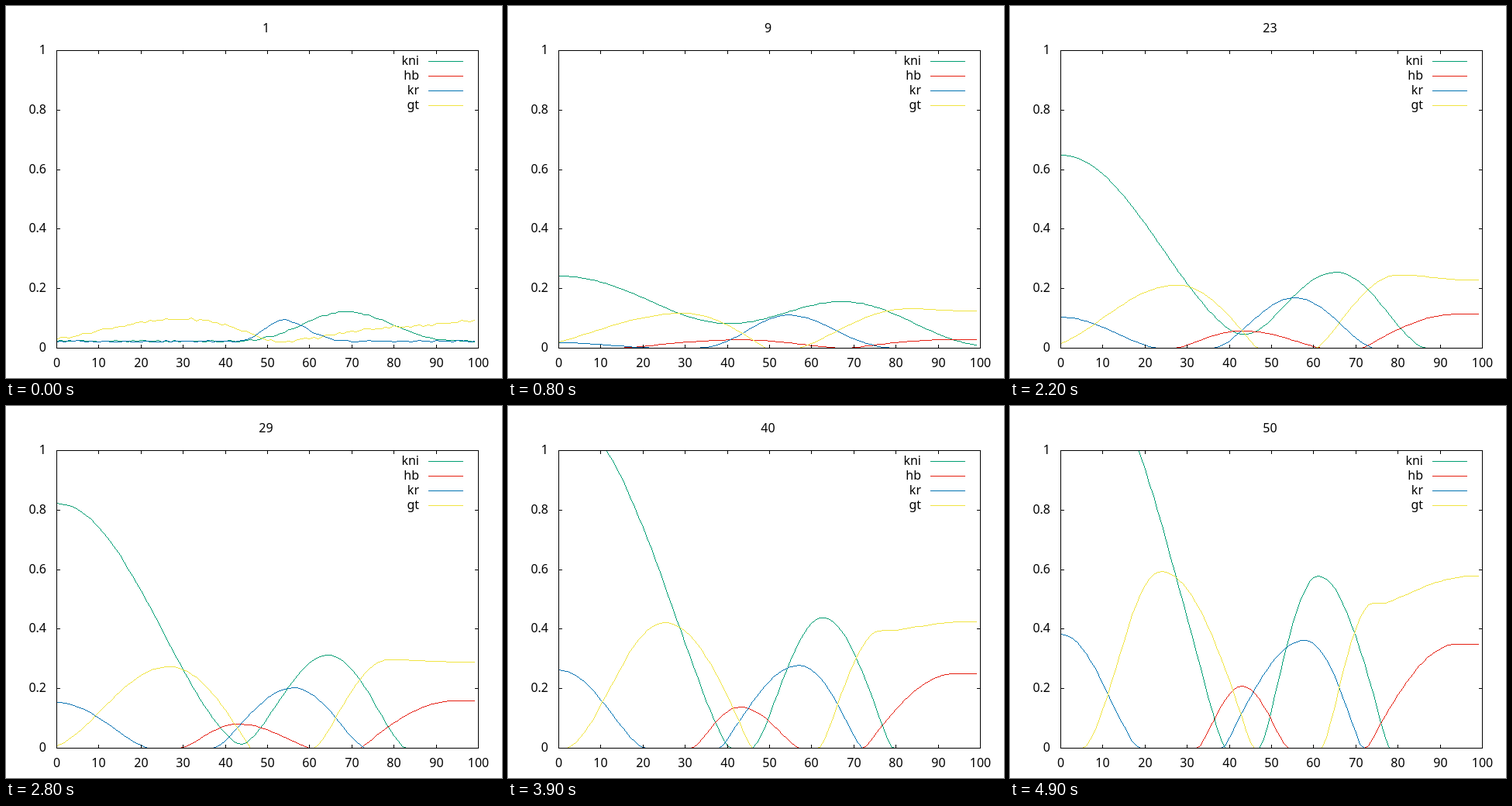
Animation, 640 px wide and 480 px high, one loop 5 s. Source, as an HTML page with a canvas:

```html
<!DOCTYPE html>
<html lang="en">
<head>
<meta charset="utf-8">
<title>Gene expression</title>
<style>
  html, body { margin: 0; width: 100%; height: 100%; overflow: hidden; background: #fff; }
  canvas { display: block; }
</style>
</head>
<body>
<canvas id="stage" width="640" height="480"></canvas>
<script>
const ctx = document.getElementById('stage').getContext('2d');
const STEP = 100, STEPS = 50;
const LEFT = 65, RIGHT = 609, TOP = 57, BOTTOM = 441;
const FLOOR = 0.023;

// Rules for how a parameter changes with the step.
function clock(step) {
  const t = step - 9;
  const decay = Math.pow(2, -t / 8);
  const sharp = Math.max(decay, decay ** 3);
  const early = Math.max(0, 1 - (step - 1) / 8);
  return {
    early,
    // Parabola through the levels at steps 9, 29 and 50.
    grow(a, b, c) {
      const s = (b - a) / 20, r = (c - b) / 21;
      return Math.max(0, a + s * t + (r - s) / 41 * t * (t - 20));
    },
    drift: (a, b) => a + (b - a) * t / 41,
    settle: (a, b) => b + (a - b) * decay,
    power: (last, extra) => last + extra * sharp
  };
}

// Climbs from 0 at the foot to 1 at the peak, from either side.
function limb(x, foot, peak, power) {
  const u = Math.min(1, Math.max(0, (x - foot) / (peak - foot)));
  return Math.pow(Math.sin(u * Math.PI / 2), power);
}

function kni({ grow, drift, settle, power }) {
  const edge = grow(0.242, 0.822, 1.42), edgeFoot = settle(84, 37.4);
  const hump = grow(0.156, 0.312, 0.578), peak = drift(67.5, 61);
  const left = settle(15, 48.2), right = settle(110, 76.8);
  return x => edge * limb(x, edgeFoot, 0, power(1, 4))
    + hump * limb(x, left, peak, power(1.2, 3)) * limb(x, right, peak, power(1, 2));
}

function hb({ grow, drift, settle, early }) {
  const hump = grow(0.028, 0.081, 0.208) * (1 - early);
  const ramp = grow(0.029, 0.158, 0.349) * (1 - early);
  const left = settle(14, 33), right = drift(66.5, 54), foot = settle(69, 72.8);
  return x => hump * limb(x, left, 43, 1.3) * limb(x, right, 43, 1.3)
    + ramp * limb(x, foot, 94, 1);
}

function kr({ grow, drift, settle, power }) {
  const edge = grow(0.018, 0.153, 0.383), edgeFoot = drift(25.5, 18.7);
  const hump = grow(0.111, 0.203, 0.362), peak = drift(54.5, 57.9);
  const left = settle(30, 38.9), right = settle(83, 71), p = power(1, 2);
  return x => edge * limb(x, edgeFoot, 0, power(1.4, 0.5))
    + hump * limb(x, left, peak, p) * limb(x, right, peak, p);
}

function gt({ grow, drift, settle }) {
  const hump = grow(0.117, 0.274, 0.594), peak = drift(29.5, 23.7);
  const left = drift(-9, 5), right = settle(49, 45.3);
  const shelf = grow(0.132, 0.297, 0.488), tail = grow(0.125, 0.289, 0.578);
  const foot = settle(57, 62.2), shoulder = drift(83, 74.2);
  return x => hump * limb(x, left, peak, 1.7) * limb(x, right, peak, 1)
    + shelf * limb(x, foot, shoulder, 1.25)
    + (tail - shelf) * limb(x, shoulder + 3, 98, 1.1);
}

const genes = [
  { name: 'kni', color: '#009e73', shape: kni, floor: FLOOR, noise: 0.0025 },
  { name: 'hb', color: '#e51e10', shape: hb, floor: 0, noise: 0 },
  { name: 'kr', color: '#0072b2', shape: kr, floor: FLOOR, noise: 0.0025 },
  { name: 'gt', color: '#f0e442', shape: gt, floor: FLOOR, noise: 0.004 }
];

function jitter(x, seed) {
  const s = Math.sin(x * 12.9898 + seed * 78.233) * 43758.5453;
  return (s - Math.floor(s)) * 2 - 1;
}

// One-pixel line without smoothing.
function pixelLine(x0, y0, x1, y1) {
  const n = Math.max(Math.abs(x1 - x0), Math.abs(y1 - y0), 1);
  for (let i = 0; i <= n; i++) {
    ctx.fillRect(Math.round(x0 + (x1 - x0) * i / n), Math.round(y0 + (y1 - y0) * i / n), 1, 1);
  }
}

const toX = x => Math.round(LEFT + x * (RIGHT - LEFT) / 100);
const toY = v => Math.round(BOTTOM - v * (BOTTOM - TOP));

function text(str, x, y, align) {
  ctx.textAlign = align;
  ctx.fillText(str, x, y);
}

function drawCurve(gene, seed, step) {
  const time = clock(step);
  const level = gene.shape(time);
  const noise = gene.noise * Math.pow(0.35, step - 1);
  ctx.fillStyle = gene.color;
  let px, py;
  for (let i = 0; i < 100; i++) {
    const v = Math.hypot(level(i), gene.floor * time.early) + noise * jitter(i, seed);
    const x = toX(i), y = toY(Math.max(0, v));
    if (i) pixelLine(px, py, x, y);
    px = x;
    py = y;
  }
}

function drawFrame() {
  ctx.fillStyle = '#000';
  ctx.fillRect(LEFT, TOP, RIGHT - LEFT + 1, 1);
  ctx.fillRect(LEFT, BOTTOM, RIGHT - LEFT + 1, 1);
  ctx.fillRect(LEFT, TOP, 1, BOTTOM - TOP + 1);
  ctx.fillRect(RIGHT, TOP, 1, BOTTOM - TOP + 1);
  for (let i = 0; i <= 10; i++) {
    const x = toX(i * 10);
    ctx.fillRect(x, TOP, 1, 5);
    ctx.fillRect(x, BOTTOM - 4, 1, 5);
    text(String(i * 10), x + 0.5, 466, 'center');
  }
  for (let i = 0; i <= 5; i++) {
    const y = toY(i / 5);
    ctx.fillRect(LEFT, y, 5, 1);
    ctx.fillRect(RIGHT - 4, y, 5, 1);
    text(String(i / 5), 52, y + 5, 'right');
  }
}

function drawKey() {
  genes.forEach((gene, i) => {
    const y = 71 + 19 * i;
    ctx.fillStyle = '#000';
    text(gene.name, 533, y + 5, 'right');
    ctx.fillStyle = gene.color;
    ctx.fillRect(545, y, 45, 1);
  });
}

function draw(step) {
  ctx.fillStyle = '#fff';
  ctx.fillRect(0, 0, 640, 480);
  ctx.font = '16px "Noto Sans", sans-serif';
  ctx.save();
  ctx.beginPath();
  ctx.rect(LEFT, TOP, RIGHT - LEFT, BOTTOM - TOP);
  ctx.clip();
  genes.forEach((gene, i) => drawCurve(gene, i + 1, step));
  ctx.restore();
  drawKey();
  drawFrame();
  text(String(step), 335.5, 33.5, 'center');
}

const start = performance.now();
let shown = 0;
function tick() {
  const step = Math.floor((performance.now() - start) / STEP) % STEPS + 1;
  if (step !== shown) draw(shown = step);
  requestAnimationFrame(tick);
}
tick();
</script>
</body>
</html>
```
